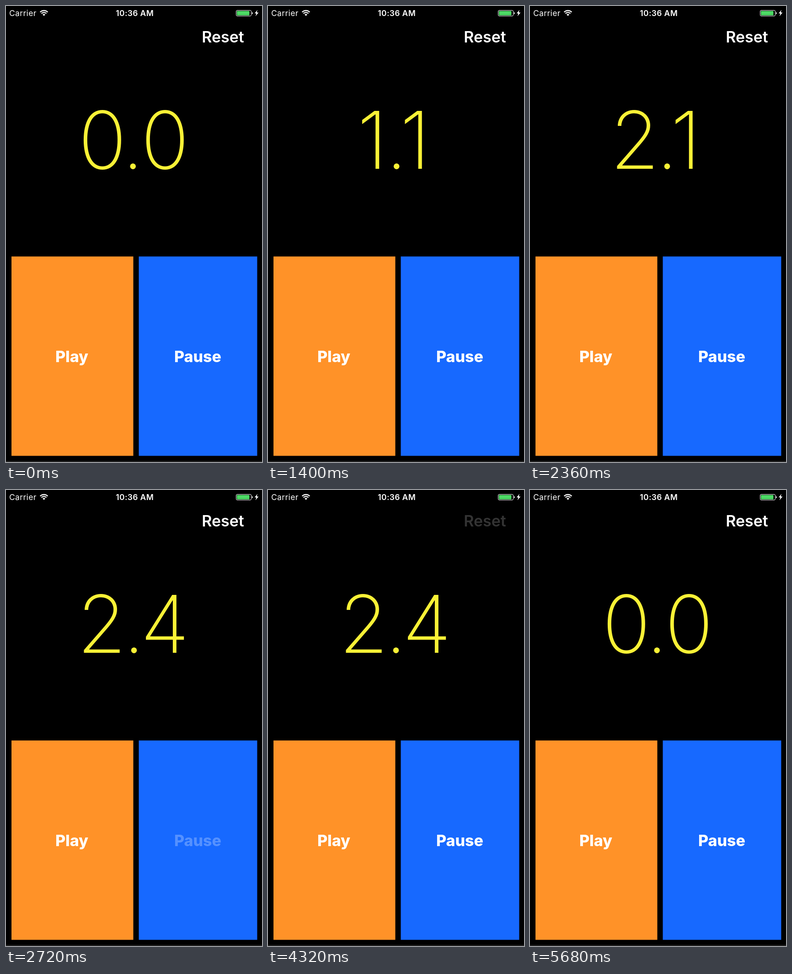
Animation of 560x1000 px, one loop 5800 ms. Source, as an HTML page:

```html
<!DOCTYPE html>
<html lang="en">
<head>
<meta charset="utf-8">
<title>Stopwatch</title>
<style>
  html, body { margin: 0; width: 100%; height: 100%; overflow: hidden; background: #000; }
  svg { display: block; width: 560px; height: 1000px; }
  text { font-family: Inter, Roboto, sans-serif; fill: #fff; }
  .status { font-size: 17.4px; letter-spacing: .4px; }
  .digit { font-size: 175px; font-weight: 200; fill: #f9f136; }
</style>
</head>
<body>
<svg viewBox="0 0 560 1000">
  <rect width="560" height="1000"/>
  <rect y="998" width="560" height="1" fill="#444"/>

  <text class="status" x="7" y="22">Carrier</text>
  <g fill="none" stroke="#fff" stroke-width="2.4">
    <path d="M74.7 13.5A11.7 11.7 0 0 1 91.3 13.5"/>
    <path d="M77.6 16.4A7.6 7.6 0 0 1 88.4 16.4"/>
    <path d="M83 21.8L80 18.8A4.2 4.2 0 0 1 86 18.8Z" fill="#fff" stroke="none"/>
  </g>
  <text class="status" x="281.7" y="22" text-anchor="middle" font-weight="600">10:36 AM</text>
  <rect x="503.5" y="9.5" width="33" height="12.5" rx="2.5" fill="none" stroke="#fff"/>
  <rect x="505" y="11" width="27.5" height="9.5" rx="1" fill="#4cd964"/>
  <path d="M538 13.2Q540 13.8 540 15.7T538 18.2Z" fill="#fff"/>
  <path d="M550 8.5L544 16.2H547.6L545.8 22.4L552.4 14.2H548.6Z" fill="#fff"/>

  <rect x="12" y="549.3" width="266.5" height="437.2" fill="#ff9228"/>
  <rect x="290.5" y="549.3" width="259" height="437.2" fill="#1769ff"/>
  <text id="reset" y="80" font-size="34" font-weight="600">Reset</text>
  <text id="play" y="781" font-size="34" font-weight="800">Play</text>
  <text id="pause" y="781" font-size="34" font-weight="800">Pause</text>

  <text id="whole" class="digit" y="357">0</text>
  <circle id="dot" cy="351.6" r="6.3" fill="#f9f136"/>
  <text id="tenth" class="digit" y="357">0</text>
</svg>
<script>
const LOOP = 5800, STEP = 40, FADE = 470;
const START = 250, STOP = 2700, CLEAR = 4460;

// press and release time of each button
const taps = { play: [120, START], pause: [2560, STOP], reset: [4320, CLEAR] };

// glyph widths relative to "0", and ink centres measured from the dot
const leftWidth = [0, -42.6, -5];
const leftInk = [-67.2, -56.3, -70.3];
const rightWidth = [0, -49.6, -5, 0, -9.6, -4, -2, -14, -1, -2];
const rightInk = [69.8, 37.4, 68, 71, 68, 70, 70, 61, 69.5, 69];

const $ = id => document.getElementById(id);
const pen = document.createElement('canvas').getContext('2d');

// set a text so that the middle of its visible ink lies at cx
function centre(el, cx) {
  const s = getComputedStyle(el);
  pen.font = `${s.fontWeight} ${s.fontSize} ${s.fontFamily}`;
  const m = pen.measureText(el.textContent);
  const mid = (m.actualBoundingBoxRight - m.actualBoundingBoxLeft) / 2;
  el.setAttribute('x', cx - mid);
}

function labelAlpha(t, [down, up]) {
  if (t < down) return 1;
  const p = Math.min(Math.max((t - up) / FADE, 0), 1);
  return 1 - 0.8 * (1 - p) ** 2;
}

function count(t) {
  if (t < START || t >= CLEAR) return 0;
  return Math.floor((Math.min(t, STOP) - START) / 100);
}

let shown = -1;
function showCount(n) {
  if (n === shown) return;
  shown = n;
  const a = Math.floor(n / 10), b = n % 10;
  const x = 277.7 + (leftWidth[a] - rightWidth[b]) / 2;
  $('whole').textContent = a;
  $('tenth').textContent = b;
  $('dot').setAttribute('cx', x);
  centre($('whole'), x + leftInk[a]);
  centre($('tenth'), x + rightInk[b]);
}

centre($('reset'), 475.5);
centre($('play'), 144.5);
centre($('pause'), 419.7);

const begin = performance.now();
function draw() {
  const t = Math.floor((performance.now() - begin) % LOOP / STEP) * STEP;
  showCount(count(t));
  for (const id in taps) $(id).style.opacity = labelAlpha(t, taps[id]);
  requestAnimationFrame(draw);
}
draw();
</script>
</body>
</html>
```
